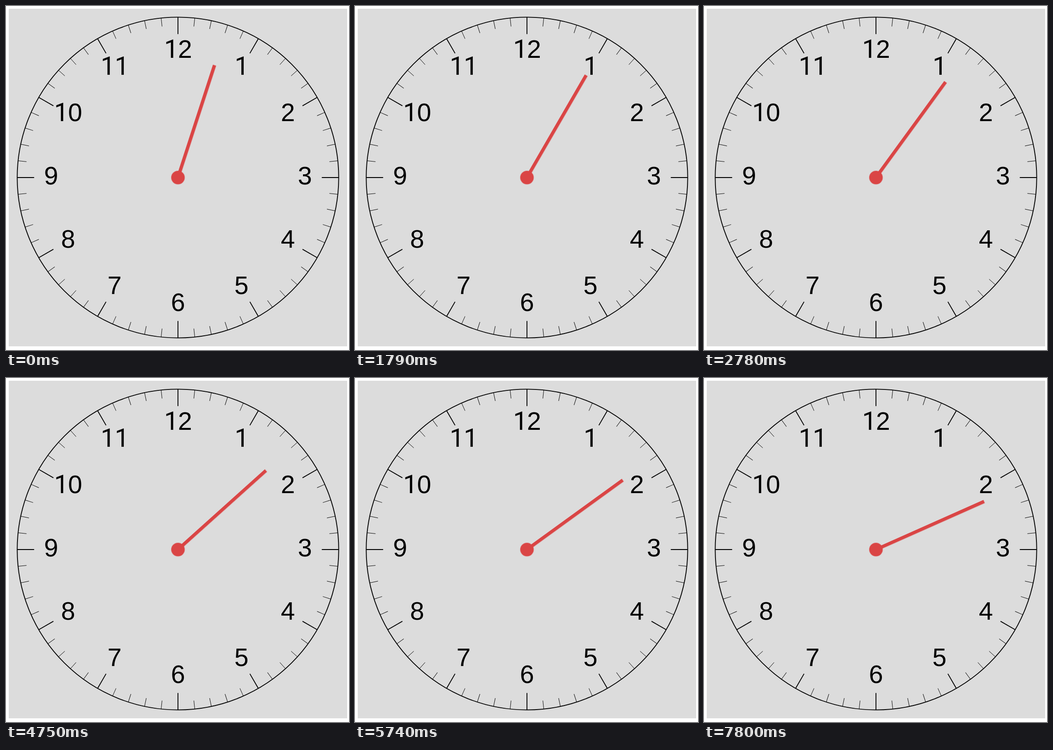
Write an HTML page that moves like this. It is 746 by 750 pixels and loops after 8 s.

```html
<!DOCTYPE html>
<html lang="en">
<head>
<meta charset="utf-8">
<title>Clock</title>
<style>
  html, body { margin: 0; width: 100%; height: 100%; overflow: hidden; background: #fff; }
  svg { display: block; width: 746px; height: 750px; }
  text { font: 30px "Liberation Sans", Arial, sans-serif; text-anchor: middle; }
  .one { font-family: Roboto, sans-serif; }
  .rim, .hour { stroke: #000; stroke-width: 1; fill: none; }
  .minute { stroke: #000; stroke-width: .5; }
  .hand { animation: tick 8s step-end infinite; }
  @keyframes tick {
    0% { transform: rotate(18deg); }
    10% { transform: rotate(24deg); }
    22.375% { transform: rotate(30deg); }
    34.75% { transform: rotate(36deg); }
    47% { transform: rotate(42deg); }
    59.375% { transform: rotate(48deg); }
    71.75% { transform: rotate(54deg); }
    84% { transform: rotate(60deg); }
    97.5%, 100% { transform: rotate(66deg); }
  }
</style>
</head>
<body>
<svg viewBox="0 0 746 750">
  <g transform="translate(374 374) scale(1.84)">
    <rect x="-200" y="-200" width="400" height="400" fill="#dcdcdc"/>
    <circle class="rim" r="190"/>
    <g id="dial"></g>
    <g class="hand"><path d="M0 0V-140" stroke="#da4545" stroke-width="4"/></g>
    <circle r="8" fill="#da4545"/>
  </g>
</svg>
<script>
  const dial = document.getElementById('dial');
  const DIGIT = 16.68, BASELINE = 8.2;

  function add(tag, attrs, text = '') {
    const el = document.createElementNS('http://www.w3.org/2000/svg', tag);
    for (const key in attrs) el.setAttribute(key, attrs[key]);
    el.textContent = text;
    dial.append(el);
  }

  for (let i = 0; i < 60; i++) {
    const hour = i % 5 === 0;
    add('path', {
      class: hour ? 'hour' : 'minute',
      d: `M0-190v${hour ? 20 : 10}`,
      transform: `rotate(${i * 6})`
    });
  }

  // The digit 1 is set in a face without a foot serif.
  for (let h = 1; h <= 12; h++) {
    const a = h * Math.PI / 6, chars = [...String(h)];
    chars.forEach((c, i) => {
      const shift = (i - (chars.length - 1) / 2) * DIGIT;
      add('text', {
        class: c === '1' ? 'one' : '',
        x: 150 * Math.sin(a) + shift + (c === '1' ? .4 : 0),
        y: BASELINE - 150 * Math.cos(a)
      }, c);
    });
  }
</script>
</body>
</html>
```
